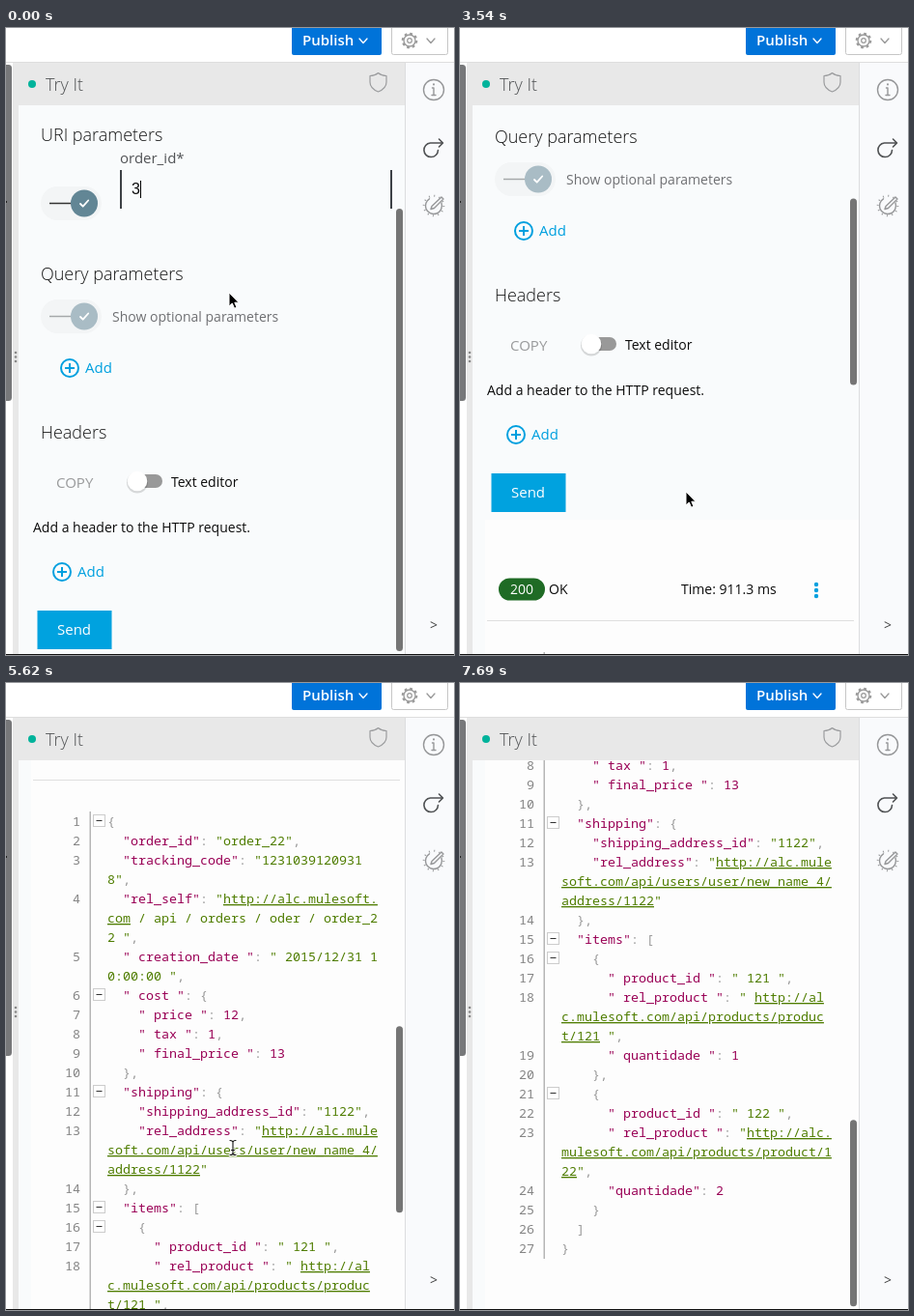
An HTML page for the animation above (8.06 s loop, 464x649 px).

```html
<!DOCTYPE html>
<html lang="en">
<head>
<meta charset="utf-8">
<title>Try It console</title>
<style>
html, body { margin: 0; width: 100%; height: 100%; overflow: hidden; background: #fff; }
svg { display: block; }
text { font: 14px "Open Sans", sans-serif; fill: #0c0c0c; }
.head { font-size: 18px; font-weight: 300; fill: #161616; }
.mid { font-size: 15px; }
.blue { fill: #00a0df; }
.dim { fill: #6f7073; }
.line { fill: none; stroke-linecap: round; stroke-linejoin: round; }
.code text { font: 13.333px "Noto Sans Mono", monospace; fill: #999; white-space: pre; }
.code .num { text-anchor: end; fill: #858585; }
.key { fill: #905; }
.str, .link { fill: #4f7d00; }
.link { text-decoration: underline; }
#field rect { fill: #3d4146; }
#field .fill { fill: none; }
#field.blur rect { fill: #868788; }
#field.blur .fill { fill: #f3f3f3; }
#button { fill: #00a2df; }
#button.hover { fill: #0d5672; }
</style>
</head>
<body>
<svg width="464" height="649" viewBox="0 0 464 649">
  <defs>
    <clipPath id="view"><rect x="13" y="80" width="400" height="568"/></clipPath>
    <g id="toggle">
      <rect x="-45" y="-17.5" width="63" height="35" rx="17.5" fill="#f3f5f6"/>
      <path d="M-36 0H-12" stroke="currentColor" stroke-width="1.5"/>
      <circle r="14"/>
      <path class="line" d="M-4 .5L-1.3 3.2 4.2-3" stroke="#fff" stroke-width="1.8"/>
    </g>
    <g id="add">
      <circle r="9" fill="none" stroke="#00a0df" stroke-width="2"/>
      <path d="M-5 0H5M0-5V5" stroke="#00a0df" stroke-width="2"/>
      <text class="mid blue" x="16" y="5">Add</text>
    </g>
    <path id="chevron" class="line" d="M-4-2L0 2.5 4-2" stroke-width="1.3"/>
    <path id="arrow" d="M0 0V14L3.3 11 5.6 16.2 8 15.2 5.8 10.2H10Z" fill="#000" stroke="#fff" stroke-width="1"/>
    <g id="beam" class="line" stroke="#fff" stroke-width="3">
      <path id="stem" d="M-3-7.5Q0-7.5 0-5.5Q0-7.5 3-7.5M0-5.5V5.5M-3 7.5Q0 7.5 0 5.5Q0 7.5 3 7.5M-1.5 2.5H1.5"/>
      <use href="#stem" stroke="#111" stroke-width="1.1"/>
    </g>
    <path id="hand" d="M-2-5.5Q-2-7.5-.5-7.5T1-5.5V-1.5Q2.5-2.6 3.6-1Q5-1.8 5.9-.2Q8-.6 8 1.5V4Q8 6 6.5 7.5V9H-1.2V7.5L-5.5 1.5Q-6 0-4.5-.3Q-3 0-2 2Z" fill="#fff" stroke="#111" stroke-width="1.1"/>
  </defs>

  <!-- page frame -->
  <rect width="464" height="649" fill="#fff"/>
  <rect y="35" width="464" height="1" fill="#dedede"/>
  <rect x="7" y="36" width="407" height="613" fill="#e8e8e8"/>
  <rect x="-4" y="38" width="10" height="348" rx="3.5" fill="#77787a"/>
  <rect y="179" width="1" height="2" fill="#222"/>
  <g fill="#888"><circle cx="10" cy="336" r="1.3"/><circle cx="10" cy="340.5" r="1.3"/><circle cx="10" cy="345" r="1.3"/></g>
  <rect x="13" y="80" width="400" height="569" fill="#f9fbfc"/>
  <rect x="413" y="36" width="1" height="612" fill="#dcdddf"/>
  <rect x="414" y="36" width="50" height="612" fill="#f9fafc"/>

  <!-- top bar -->
  <rect x="296" y="-4" width="93" height="32" rx="2" fill="#0073d9"/>
  <text x="307" y="18" style="font-size:15px;font-weight:600;fill:#fff">Publish</text>
  <use href="#chevron" x="370" y="13" stroke="#fff"/>
  <rect x="399.5" y="-4.5" width="58" height="32" rx="2" fill="#fff" stroke="#c6c6c6"/>
  <g fill="none" stroke="#999">
    <circle cx="418" cy="13" r="6" stroke-width="1.3"/>
    <circle cx="418" cy="13" r="7.3" stroke-width="2" stroke-dasharray="2.8 2.93"/>
    <circle cx="418" cy="13" r="2.3" stroke-width="1.2"/>
    <use href="#chevron" x="440" y="13"/>
  </g>
  <circle cx="27" cy="58" r="4" fill="#00b39b"/>
  <text class="head" x="41" y="65" style="fill:#505254">Try It</text>
  <path class="line" d="M385.500 46.500Q389 49.500 394 49.500V56Q394 62.500 385.500 66Q377 62.500 377 56V49.500Q382 49.500 385.500 46.500Z" stroke="#9b9c9e" stroke-width="1.2"/>

  <!-- right rail -->
  <g class="line" stroke="#969799" stroke-width="1.4">
    <circle cx="443" cy="64" r="10.500"/>
    <path d="M443 62V69.500M441.500 62H443M441 69.500H445"/>
    <path d="M443 58.300V58.500" stroke-width="2"/>
    <path d="M452 119H439.500A7.300 7.300 0 1 0 447.500 126.500M448.500 115L452.500 119 448.500 123" stroke="#505254" stroke-width="1.600"/>
    <circle cx="443" cy="184" r="8.500" stroke-dasharray="38 15.400" transform="rotate(-20 443 184)"/>
    <circle cx="443" cy="184" r="10.300" stroke-width="2" stroke-dasharray="1 4.390" stroke-linecap="butt"/>
    <path d="M440 187.500L441 184.500 451 175 453 177 443.500 186.500Z" fill="#f9fafc"/>
  </g>
  <text x="439" y="623" style="fill:#444">&gt;</text>

  <!-- scrolling panel -->
  <g clip-path="url(#view)">
    <g id="page">
      <text class="head" x="36" y="117">URI parameters</text>
      <text class="mid" x="118" y="140" style="fill:#515356">order_id*</text>
      <use href="#toggle" x="81" y="181.500" fill="#628695" color="#333"/>
      <g id="field">
        <rect class="fill" x="118" y="147" width="282" height="40"/>
        <rect x="118" y="147" width="2" height="40"/>
        <rect x="398" y="147" width="2" height="40"/>
      </g>
      <text id="value" x="130" y="172" style="font:16px 'Liberation Sans',sans-serif">3</text>
      <rect id="caret" x="139" y="158" width="1" height="18"/>
      <text id="warning" x="118" y="201" style="fill:#515356">Value is required but currently empty.</text>

      <text class="head" x="36" y="261">Query parameters</text>
      <use href="#toggle" x="81" y="298.500" fill="#a9bcc5" color="#a5a8aa"/>
      <text class="dim" x="110" y="304">Show optional parameters</text>
      <use href="#add" x="66" y="352"/>

      <text class="head" x="36" y="425">Headers</text>
      <text class="mid" x="52" y="476" style="fill:#9a9b9c">COPY</text>
      <rect x="134" y="462" width="28" height="14" rx="7" fill="#999"/>
      <circle cx="136" cy="470.500" r="11" fill="#000" opacity=".14"/>
      <circle cx="136" cy="469" r="10.300" fill="#fff"/>
      <text x="171" y="475">Text editor</text>
      <text x="28" y="522">Add a header to the HTTP request.</text>
      <use href="#add" x="58" y="563"/>
      <rect id="button" x="32.500" y="603" width="77" height="40"/>
      <text class="mid" x="53" y="628" style="fill:#fff">Send</text>

      <g id="response">
        <rect x="26" y="651" width="387" height="980" fill="#fdfdfd"/>
        <rect x="40" y="711.500" width="48" height="23" rx="11.500" fill="#1f6b25"/>
        <text x="52" y="728" style="fill:#fff">200</text>
        <text x="92" y="728">OK</text>
        <text x="229" y="728">Time: 911.3 ms</text>
        <g class="blue"><circle cx="369" cy="718" r="2.200"/><circle cx="369" cy="724" r="2.200"/><circle cx="369" cy="730" r="2.200"/></g>
        <rect x="28" y="755" width="380" height="1" fill="#dfdfdf"/>
        <rect x="86.500" y="788" width="1.500" height="741" fill="#b5b5b5"/>
        <g id="code" class="code"></g>
      </g>
    </g>
  </g>
  <rect id="thumb" x="404" width="7" rx="3.500" fill="#757575"/>
  <rect y="648" width="464" height="1" fill="#111"/>
  <use id="pointer"/>
</svg>

<script>
// "|" marks a soft wrap
const json = `{
  "order_id": "order_22",
  "tracking_code": "1231039120931|8",
  "rel_self": "http://alc.mulesoft.|com / api / orders / oder / order_2|2 ",
  " creation_date ": " 2015/12/31 1|0:00:00 ",
  " cost ": {
    " price ": 12,
    " tax ": 1,
    " final_price ": 13
  },
  "shipping": {
    "shipping_address_id": "1122",
    "rel_address": "http://alc.mule|soft.com/api/users/user/new_name_4/|address/1122"
  },
  "items": [
    {
      " product_id ": " 121 ",
      " rel_product ": " http://al|c.mulesoft.com/api/products/produc|t/121 ",
      " quantidade ": 1
    },
    {
      " product_id ": " 122 ",
      " rel_product ": "http://alc.|mulesoft.com/api/products/product/1|22",
      "quantidade": 2
    }
  ]
}`;

const $ = id => document.getElementById(id);
const span = (cls, s) => `<tspan class="${cls}">${s.replace(/ /g, '\u00a0')}</tspan>`;

function tokens(line) {
  const out = [];
  for (const [s, key, str, num] of line.matchAll(/("[^"]*")(?=:)|("[^"]*")|(\d+)|[^"\d]+/g)) {
    if (str) str.split(/(http[^\s"]+)/).forEach((part, i) => out.push([i % 2 ? 'link' : 'str', part]));
    else out.push([key || num ? 'key' : '', s]);
  }
  return out;
}

function renderCode() {
  let y = 803, svg = '';
  json.split('\n').forEach((line, i) => {
    svg += `<text class="num" x="77" y="${y}">${i + 1}</text>`;
    if (/[{[]$/.test(line)) {
      svg += `<rect x="90.5" y="${y - 11.5}" width="12" height="12" fill="#fff" stroke="#ccc"/>
        <path d="M93.500 ${y - 5.5}h6" stroke="#333"/>`;
    }
    const rows = [''];
    for (const [cls, s] of tokens(line)) {
      s.split('|').forEach((part, k) => {
        if (k) rows.push('');
        rows[rows.length - 1] += span(cls, part);
      });
    }
    for (const row of rows) {
      svg += `<text x="105" y="${y}">${row}</text>`;
      y += 20;
    }
  });
  $('code').innerHTML = svg;
}

const LOOP = 8060, BLUR = 1470, REPLY = 2200;

// [time, scroll]
const scrolls = [
  [0, 0], [3100, 32], [3250, 82], [3400, 142], [3550, 205], [3690, 262], [3840, 312], [3990, 355],
  [4130, 389], [4280, 400], [4570, 425], [4720, 480], [4870, 535], [5020, 571],
  [5320, 588], [5470, 618], [5620, 655], [5770, 692], [5920, 724], [6070, 750], [6220, 768],
  [6370, 802], [6520, 855], [6670, 903], [6800, 933]
];

// [time, x, y, shape]
const moves = [
  [0, 231, 274, 'arrow'], [440, 222, 305, 'arrow'], [590, 182, 415, 'arrow'], [740, 140, 511, 'arrow'],
  [1040, 118, 555, 'arrow'], [1190, 95, 598, 'arrow'], [1340, 86, 626, 'hand'], [1470, 84, 630, 'hand'],
  [2200, 122, 590, 'arrow'], [2350, 198, 512, 'arrow'], [2500, 234, 480, 'arrow'],
  [3840, 235, 481, 'beam'], [5770, 234, 480, 'arrow'],
  [7100, 248, 490, 'arrow'], [7250, 298, 528, 'arrow'], [7400, 358, 578, 'arrow'], [7550, 408, 622, 'arrow'],
  [7690, 0, 0, '']
];

const at = (list, t) => list.findLast(row => row[0] <= t);
const show = (id, on) => $(id).setAttribute('visibility', on ? 'visible' : 'hidden');

function draw(t) {
  const scroll = at(scrolls, t)[1];
  const [, x, y, shape] = at(moves, t);
  const replied = t >= REPLY;

  $('page').setAttribute('transform', `translate(0 ${-scroll})`);
  $('thumb').setAttribute('y', replied ? 127 + scroll * 0.3485 : 187);
  $('thumb').setAttribute('height', replied ? 193 : 458);
  $('field').classList.toggle('blur', t >= BLUR);
  $('button').classList.toggle('hover', shape === 'hand');
  show('caret', t < 590 || (t >= 1040 && t < BLUR));
  show('value', !replied);
  show('warning', replied);
  show('response', replied);
  show('pointer', shape);
  $('pointer').setAttribute('href', '#' + shape);
  $('pointer').setAttribute('transform', `translate(${x} ${y})`);
}

function tick() {
  draw(performance.now() % LOOP);
  requestAnimationFrame(tick);
}

renderCode();
tick();
</script>
</body>
</html>
```
